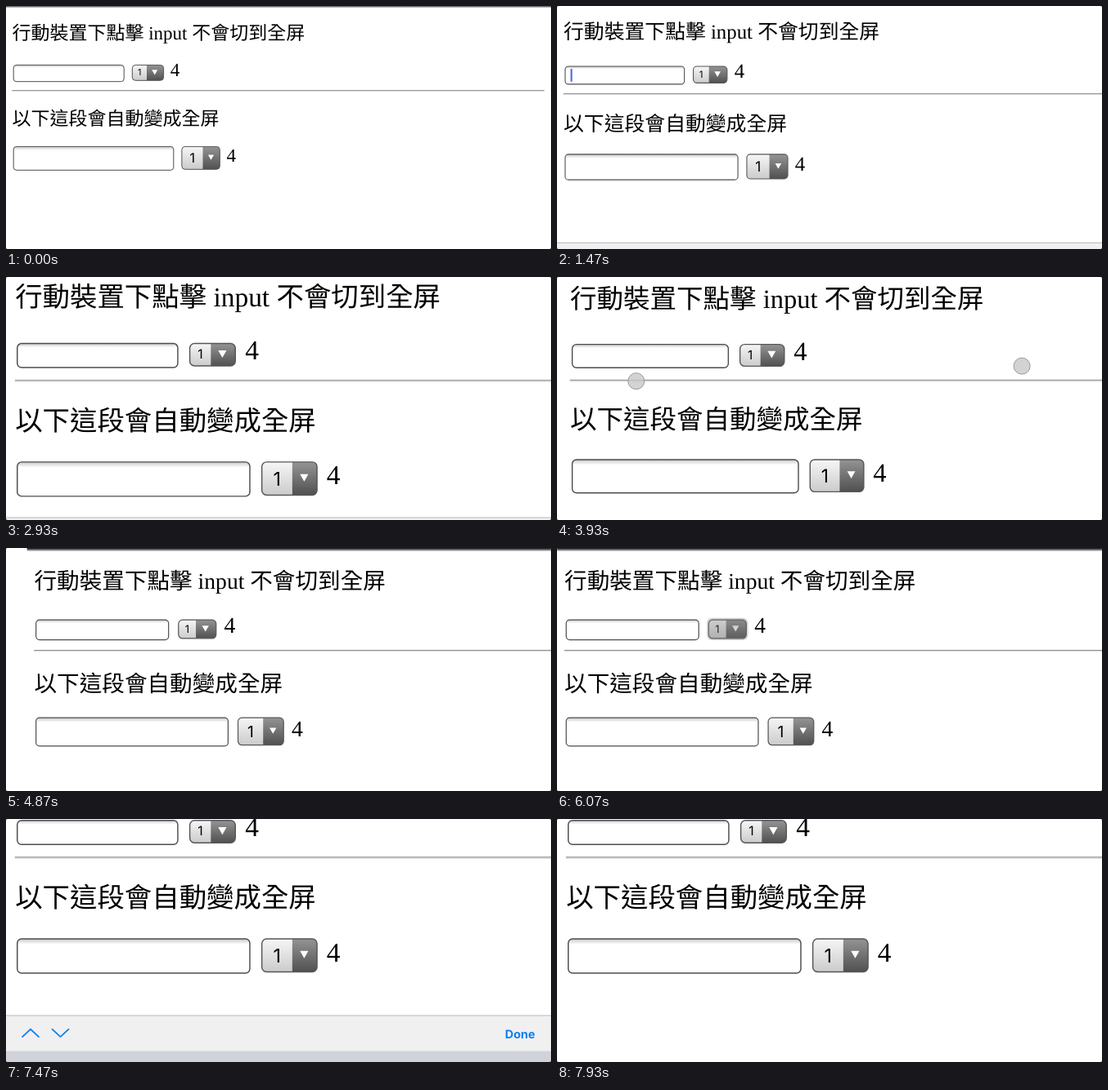
Recreate the animation shown at these times as an HTML page. Size 666 px wide and 298 px high, loop 8000 ms.

```html
<!DOCTYPE html>
<html lang="zh-TW">
<head>
<meta charset="utf-8">
<style>
html, body { margin: 0; width: 100%; height: 100%; overflow: hidden; background: #fff; }
svg { display: block; width: 666px; height: 298px; }
text { text-rendering: geometricPrecision; }
.serif { font: 23px "Liberation Serif", "Noto Sans CJK TC", "Noto Sans CJK JP", "Noto Sans CJK", serif; }
.num { font-family: Inter, Roboto, sans-serif; text-anchor: middle; }
.ui { font-family: Inter, Roboto, sans-serif; }
.field { fill: url(#field); stroke: #4c4c4c; }
.left { fill: url(#light); }
.right { fill: url(#dark); }
.edge { fill: none; stroke: #565656; }
.on .left { fill: url(#lightBlue); }
.on .right { fill: url(#darkBlue); }
.on .edge { stroke: #1d3080; }
.chev { fill: none; stroke: #0a80ee; stroke-width: 1.8; }
</style>
</head>
<body>
<svg viewBox="0 0 666 298">
  <defs id="defs"></defs>
  <g id="page">
    <rect y="-3" width="666" height="5.6" fill="url(#bar)"/>
    <text class="serif" x="7.4" y="40.7">行動裝置下點擊 input 不會切到全屏</text>
    <text class="serif" x="200.8" y="85.8">4</text>
    <text class="serif" x="7.4" y="145.6">以下這段會自動變成全屏</text>
    <text class="serif" x="269.4" y="191.4">4</text>
    <rect x="7.2" y="103" width="650.6" height="1" fill="#969696"/>
    <rect x="7.2" y="104" width="650.6" height=".8" fill="#d8d8d8"/>
    <rect class="field" x="9.2" y="72.4" width="135" height="20.3" rx="3.6"/>
    <rect class="field" x="9.2" y="172.4" width="195.6" height="28.9" rx="3.6"/>
    <rect id="caret" x="15.3" y="75.2" width="1.9" height="14.6" rx=".6" fill="#4468d4"/>
    <g id="small"></g>
    <g id="big"></g>
    <rect id="tap" x="152.4" y="70.4" width="42" height="22.6" rx="5" fill="#777" opacity=".32"/>
  </g>
  <g id="dots" fill="#c8c8c8" fill-opacity=".8" stroke="#999">
    <circle r="10"/><circle r="10"/>
  </g>
  <g id="panel">
    <rect width="666" height="44" fill="#f0f0f1"/>
    <rect width="666" height="1" fill="#b9babd"/>
    <rect y="44" width="666" height="160" fill="#d0d3da"/>
    <path d="M0 111.5H666M0 138.5H666" stroke="#b7bac1"/>
    <path id="prev" class="chev" d="M19.5 27L30 17.2L40.5 27"/>
    <path class="chev" d="M56 16.8L66.5 26.6L77 16.8"/>
    <text class="ui" x="646.5" y="28" font-size="14.4" font-weight="650" text-anchor="end" fill="#0a80ee">Done</text>
    <text class="ui" x="337" y="134" font-size="23.4" text-anchor="middle" fill="#222">1</text>
  </g>
  <path fill="#555" fill-rule="evenodd" d="M0 0H666V298H0ZM2 0Q0 0 0 2V296Q0 298 2 298H664Q666 298 666 296V2Q666 0 664 0Z"/>
</svg>
<script>
const $ = id => document.getElementById(id);

const gradient = (id, ...stops) =>
  `<linearGradient id="${id}" x2="0" y2="1">` +
  stops.map(([at, color, alpha = 1]) =>
    `<stop offset="${at}" stop-color="${color}" stop-opacity="${alpha}"/>`).join('') +
  '</linearGradient>';

$('defs').innerHTML =
  gradient('bar', [.45, '#222'], [1, '#222', 0]) +
  gradient('field', [0, '#c8c8c8'], [.16, '#fff']) +
  gradient('light', [0, '#f6f6f6'], [1, '#cbcbcb']) +
  gradient('dark', [0, '#949494'], [1, '#505050']) +
  gradient('lightBlue', [0, '#f4f6fb'], [1, '#c3cae0']) +
  gradient('darkBlue', [0, '#6680bd'], [1, '#1c3186']);

// Drop-down button: a light half with the value, a dark half with the arrow
function select(id, x, y, w, h, split, size, base, mark) {
  const r = 4;
  $(id).innerHTML =
    `<rect class="right" x="${x}" y="${y}" width="${w}" height="${h}" rx="${r}"/>
    <path class="left" d="M${split} ${y}H${x + r}q${-r} 0 ${-r} ${r}v${h - 2 * r}q0 ${r} ${r} ${r}H${split}Z"/>
    <rect class="edge" x="${x}" y="${y}" width="${w}" height="${h}" rx="${r}"/>
    <text class="num" x="${(x + split) / 2}" y="${base}" font-size="${size}">1</text>
    <path fill="#fff" d="M${mark[0]} ${mark[1]}h7l-3.5 6.2z"/>`;
}
select('small', 154.3, 72.4, 38.3, 18.9, 172, 10.8, 85.3, [178.2, 78.2]);
select('big', 214.9, 172.4, 46.4, 27.9, 240.5, 16, 192.1, [247, 182.6]);

const mix = (a, b, p) => a + (b - a) * p;
const ramp = (t, a, b) => Math.min(1, Math.max(0, (t - a) / (b - a)));
const ease = (t, a, b) => { const p = ramp(t, a, b); return p * p * (3 - 2 * p); };
const show = (id, on) => $(id).setAttribute('visibility', on ? 'visible' : 'hidden');

const ZOOM = 1.453;

function draw(t) {
  const pinch = t < 3865 ? 0 : 1 - (1 - ramp(t, 3790, 4530)) ** 3;
  const fingers = [
    [mix(70, 127, pinch), mix(146, 107, pinch)],
    [mix(601, 531, pinch), mix(96, 124, pinch)]
  ];

  // Page position: zoom to the field, pinch out with a rebound, zoom to the drop-down
  let scale, x, y;
  if (t < 3865) {
    const p = ease(t, 1370, 1750);
    scale = mix(1, ZOOM, p); x = .4 * p; y = -23.6 * p;
  } else if (t < 6100) {
    const p = ramp(pinch, .37, 1); // the page follows after a short slack
    scale = mix(ZOOM, 1.2, p);
    x = mix(.4 + 33 * p, .2, ease(t, 4812, 5000));
    y = -23.6 + 24.9 * p;
  } else {
    const p = ease(t, 6100, 6460);
    scale = mix(1.2, ZOOM, p); x = mix(.2, .4, p); y = mix(1.3, -103.5, p);
  }
  $('page').setAttribute('transform', `translate(${x} ${y}) scale(${scale})`);

  show('caret', t >= 1330 && t < 2670);
  $('caret').setAttribute('opacity', 1 - ramp(t, 2180, 2470));
  show('tap', t >= 6065 && t < 6190);
  $('small').setAttribute('class', t >= 6190 && t < 7270 ? 'on' : '');

  show('dots', t >= 3525 && t < 4665);
  fingers.forEach(([cx, cy], i) => {
    $('dots').children[i].setAttribute('cx', cx);
    $('dots').children[i].setAttribute('cy', cy);
  });

  const bar = ease(t, 1370, 1700) - ease(t, 2640, 3000);
  const picker = ease(t, 6100, 6460) - ease(t, 7240, 7600);
  $('panel').setAttribute('transform', `translate(0 ${298 - 36 * bar - 196 * picker})`);
  $('prev').style.stroke = t < 4000 ? '#c6c6ca' : '';
}

function tick() {
  draw(performance.now() % 8000);
  requestAnimationFrame(tick);
}
tick();
</script>
</body>
</html>
```
